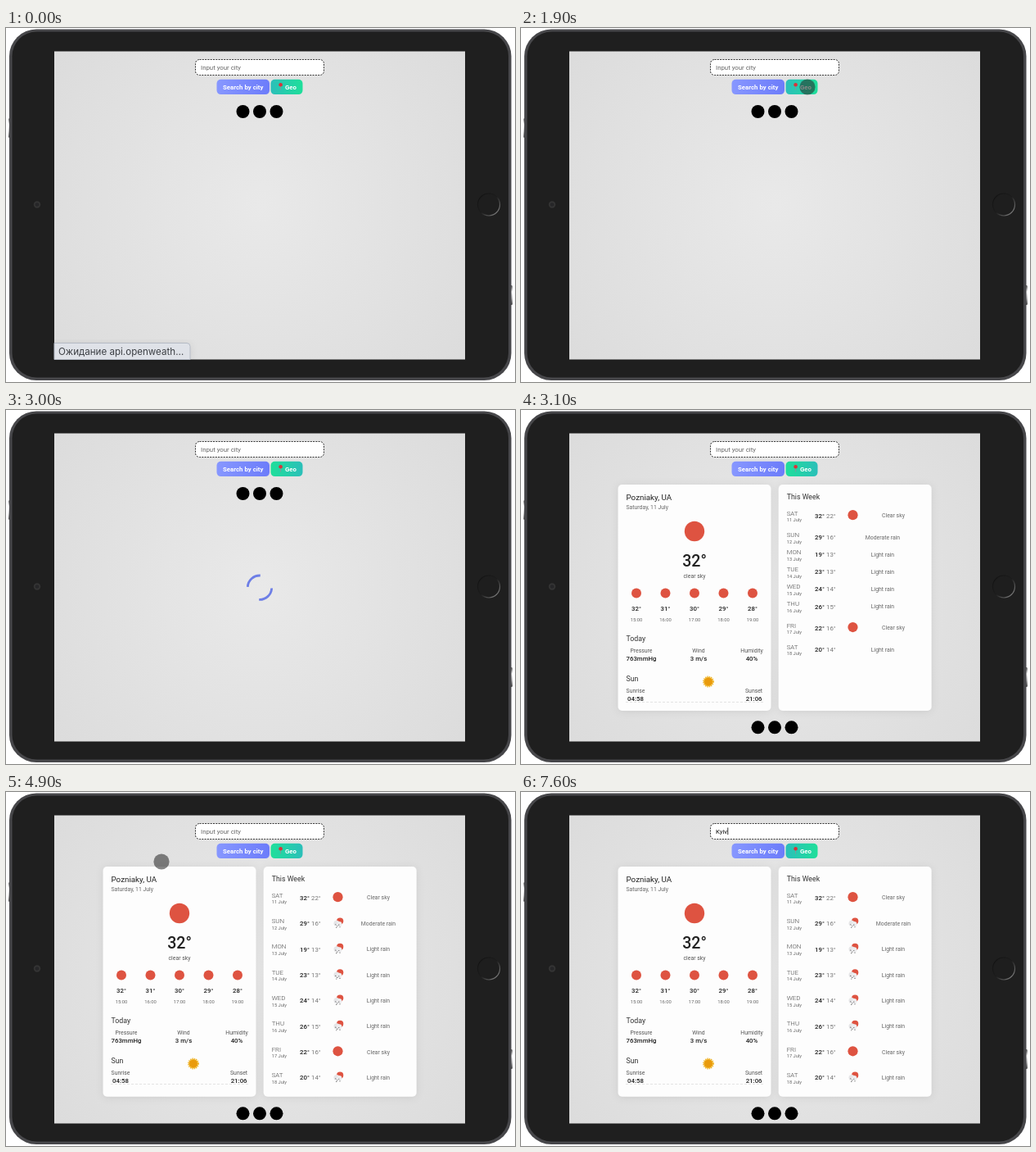
These frames come from a looping animation (622 by 432 pixels, 8 s). An HTML page:

```html
<!DOCTYPE html>
<html lang="en">
<head>
<meta charset="utf-8">
<title>Weather on a tablet</title>
<style>
  html, body { margin: 0; width: 100%; height: 100%; overflow: hidden; background: #fff; }
  svg { display: block; width: 622px; height: 432px; }
  text { font-family: Roboto, Arial, sans-serif; white-space: pre; }
</style>
</head>
<body>
<svg id="stage" viewBox="0 0 622 432" xmlns="http://www.w3.org/2000/svg"></svg>
<script>
const REM = 7.84, RED = '#de5341';

const text = (x, y, str, size = REM, fill = '#222', weight = 400, anchor = 'start') =>
  `<text x="${x}" y="${y}" font-size="${size}" fill="${fill}" font-weight="${weight}" text-anchor="${anchor}">${str}</text>`;
const mid = (x, y, str, size, fill, weight) => text(x, y, str, size, fill, weight, 'middle');
const circle = (x, y, r, fill, more = '') => `<circle cx="${x}" cy="${y}" r="${r}" fill="${fill}" ${more}/>`;
const rect = (x, y, w, h, rx, fill, more = '') =>
  `<rect x="${x}" y="${y}" width="${w}" height="${h}" rx="${rx}" fill="${fill}" ${more}/>`;
const gradient = (id, attrs, ...stops) => `<linearGradient id="${id}" ${attrs}>` +
  stops.map((c, i) => `<stop offset="${i / (stops.length - 1)}" stop-color="${c}"/>`).join('') + '</linearGradient>';

const defs = `<defs>
  <radialGradient id="page" gradientUnits="userSpaceOnUse" cx="310" cy="216" r="310">
    <stop offset="0" stop-color="#e9e9e9"/><stop offset="1" stop-color="#dcdcdc"/>
  </radialGradient>
  ${gradient('search', '', '#8797ff', '#6c7cfa')}
  ${gradient('geo', 'gradientUnits="userSpaceOnUse" x1="323.5" x2="401.5"', '#2bbfb9', '#1fdf9a', '#2bbfb9')}
  ${gradient('glint', 'x2="0" y2="1"', '#555', '#fff', '#bbb', '#444')}
  ${gradient('home', 'x2="1" y2="1"', '#111', '#1c1c1c', '#999')}
  <filter id="shadow" x="-20%" y="-20%" width="140%" height="140%">
    <feDropShadow dx="0" dy="1" stdDeviation="5" flood-opacity=".09"/>
  </filter></defs>`;

const device =
  rect(3, 110, 4, 24, 1.5, 'url(#glint)') + rect(615, 314, 4, 24, 1.5, 'url(#glint)') +
  rect(4, 1.5, 613.5, 428.5, 33, '#47474a') + rect(7.5, 4.5, 606.5, 422, 30, '#1f1f1f') +
  circle(38, 215.5, 4.2, '#343434') + circle(38, 215.5, 2.3, '#262628') +
  circle(590, 215.5, 13.5, '#1e1e1e', 'stroke="url(#home)" stroke-width="1.2"') +
  rect(59, 28.5, 502, 376, 0, 'url(#page)');

const controls =
  rect(231.5, 38.5, 157, 19, 5, '#fff', 'stroke="#222" stroke-width=".9" stroke-dasharray="2 1.3"') +
  `<text id="field" x="238" y="50.6" font-size="${REM}"></text><path id="caret" stroke="#000" stroke-width=".8"/>` +
  rect(257.5, 62.7, 64.5, 18.4, 5, 'url(#search)') + text(265, 74.6, 'Search by city', REM, '#fff', 700) +
  rect(323.5, 62.7, 39, 18.4, 5, 'url(#geo)') + text(341, 74.6, 'Geo', REM, '#fff', 700) +
  '<path d="M335.6 70V75.5" stroke="#8b9499" stroke-width=".9"/>' + circle(335.6, 69.2, 2.3, '#d8333a');

const links = [289.5, 310, 330.5].map(x => circle(x, 102, 8, '#000')).join('');

const status = `<g id="status"><path d="M59 384.5H221q4 0 4 4V404.5H59z" fill="#dfe2e8" stroke="#b4bac4" filter="url(#shadow)"/>
  <text x="64" y="398.8" font-size="11.6" fill="#3c3f44" style="font-family:Inter,sans-serif">Ожидание api.openweath…</text></g>`;

const hours = [32, 31, 30, 29, 28].map((deg, i) => {
  const x = 141 + 35.5 * i;
  return circle(x, 223.5, 6, RED) + mid(x, 244.7, deg + '°', REM, '#222', 500) +
    mid(x, 257.6, 15 + i + ':00', 5.88, '#666');
}).join('');

const pair = (x, y, label, value) =>
  mid(x, y, label, 6.86, '#555') + mid(x, y + 9.8, value, REM, '#222', 500);

const today =
  text(128.5, 110, 'Pozniaky, UA', 9.8) + text(128.5, 121.4, 'Saturday, 11 July', 6.86, '#666') +
  circle(212, 148, 12.2, RED) + mid(212, 191, '32°', 19.6, '#222', 500) +
  mid(212, 204.6, 'clear sky', 6.86, '#555') + hours +
  text(128.5, 282.2, 'Today', 8.8, '#333') +
  pair(147, 296.2, 'Pressure', '763mmHg') + pair(217, 296.2, 'Wind', '3 m/s') + pair(282, 296.2, 'Humidity', '40%') +
  text(128.5, 331.2, 'Sun', 8.8, '#333') +
  circle(229, 331.5, 5.6, '#eba30f', 'stroke="#f0b62e" stroke-width="2.6" stroke-dasharray="1.3 .9"') +
  circle(229, 331.5, 4.6, '#e99a0c') +
  pair(140, 345.2, 'Sunrise', '04:58') + pair(284.6, 345.2, 'Sunset', '21:06') +
  '<path d="M128 356.5H296" stroke="#ddd" stroke-width=".8" stroke-dasharray="3 2"/>';

const rain = (x, y) => circle(x + 2.4, y - 2.2, 4.1, RED) +
  circle(x - 1.8, y + .6, 3.5, '#e6e6e8') + circle(x + 1.4, y + 1.4, 3.2, '#ededef') +
  [[-3, 2], [-1, 4], [1, 2.4], [2.2, 5], [-2, 5.6]].map(([a, b]) => circle(x + a, y + b, .6, '#555')).join('');

const days = [
  ['SAT', 32, 22, 'Clear sky'], ['SUN', 29, 16, 'Moderate rain'], ['MON', 19, 13, 'Light rain'],
  ['TUE', 23, 13, 'Light rain'], ['WED', 24, 14, 'Light rain'], ['THU', 26, 15, 'Light rain'],
  ['FRI', 22, 16, 'Clear sky'], ['SAT', 20, 14, 'Light rain']];

// Rows without a loaded icon are shorter and their description sits further left.
function forecast(loaded) {
  let y = 113.3;
  return days.map(([day, high, low, sky], i) => {
    const clear = sky === 'Clear sky', icon = loaded || clear, h = icon ? 31.35 : 21.1;
    const c = y + h / 2;
    y += h;
    return text(324.7, c - .3, day, REM, '#444', 300) + text(324.7, c + 7.3, 11 + i + ' July', 5.7, '#666') +
      text(359, c + 2.9, high + '°', REM, '#222', 500) + text(373, c + 2.9, low + '°', REM, '#777') +
      (clear ? circle(405.5, c - .8, 6.1, RED) : loaded ? rain(405.8, c - .6) : '') +
      mid(icon ? 455 : 442, c + 2.5, sky, 6.86, '#666');
  }).join('');
}

const report = (id, loaded) => {
  const card = x => rect(x, 91, 186.8, loaded ? 280.8 : 276, 5, '#fdfdfd', 'filter="url(#shadow)"');
  return `<g id="${id}">${card(118.6)}${card(314.8)}${today}` +
    text(324.7, 109, 'This Week', 8.8, '#333') + forecast(loaded) + '</g>';
};

const spinner = `<circle id="spinner" cx="310" cy="216.7" r="14.7" fill="none" stroke="#6d7ee6"
  stroke-width="2.8" pathLength="4" stroke-dasharray="1"/>`;

const $ = id => document.getElementById(id);
$('stage').innerHTML = defs + device + controls + `<g id="links">${links}</g>` +
  report('partial', false) + report('full', true) + spinner + status +
  circle(0, 0, 9.6, 'rgb(40,40,40)', 'id="touch"');

const clamp = v => Math.max(0, Math.min(1, v));
const smooth = (t, a, b) => { const p = clamp((t - a) / (b - a)); return p * p * (3 - 2 * p); };
const show = (id, on) => $(id).setAttribute('display', on ? 'inline' : 'none');

// time, x, y, visibility
const path = [
  [0, 358, 154, 0], [700, 358, 154, 0], [1000, 358, 154, 1], [1200, 358, 154, 1], [1400, 356, 136, 1],
  [1600, 352, 90, 1], [1800, 350, 72, 1], [1900, 350, 72, 1], [2100, 350, 72, 0], [4100, 27, 205, 0],
  [4200, 27, 205, .6], [4300, 42, 188, 1], [4600, 115, 123, 1], [4900, 190, 85, 1], [5000, 207, 80, 1],
  [5300, 236, 56, 1], [5500, 245, 51, 1], [6100, 245, 51, 1], [6200, 245, 51, 0], [8000, 245, 51, 0]];

function touchAt(t) {
  const i = path.findIndex(k => k[0] > t), a = path[i - 1], b = path[i];
  const p = (t - a[0]) / (b[0] - a[0]);
  return a.map((v, n) => v + (b[n] - v) * p);
}

const typing = [[6400, 'Л'], [6800, 'Лн'], [6900, 'Лнш'], [7000, 'Лншм'], [7500, 'Ky'], [7600, 'Kyiv']];

function draw(t) {
  $('status').setAttribute('opacity', clamp(1 - t / 600));

  const [, x, y, seen] = touchAt(t);
  $('touch').setAttribute('transform', `translate(${x} ${y})`);
  $('touch').setAttribute('opacity', seen * .56);

  const hover = smooth(t, 2100, 2600) - smooth(t, 5200, 5700);
  $('geo').setAttribute('gradientTransform', `translate(${-39 * hover})`);

  show('spinner', t >= 2200 && t < 3100);
  $('spinner').setAttribute('transform', `rotate(${153 + (t - 2900) * .3} 310 216.7)`);
  show('partial', t >= 3100 && t < 3200);
  show('full', t >= 3200);
  $('links').setAttribute('transform', `translate(0 ${t < 3100 ? 0 : t < 3200 ? 285.3 : 290.3})`);

  const typed = typing.filter(k => k[0] <= t).pop();
  const field = $('field');
  field.textContent = typed ? typed[1] : 'Input your city';
  field.setAttribute('fill', typed ? '#111' : '#666');
  show('caret', typed);
  if (typed) $('caret').setAttribute('d', `M${238.6 + field.getComputedTextLength()} 43.5v8.6`);
}

const start = performance.now();
function tick() {
  const t = (performance.now() - start) % 8000;
  draw(Math.floor(t / 100) * 100);
  requestAnimationFrame(tick);
}
tick();
</script>
</body>
</html>
```
